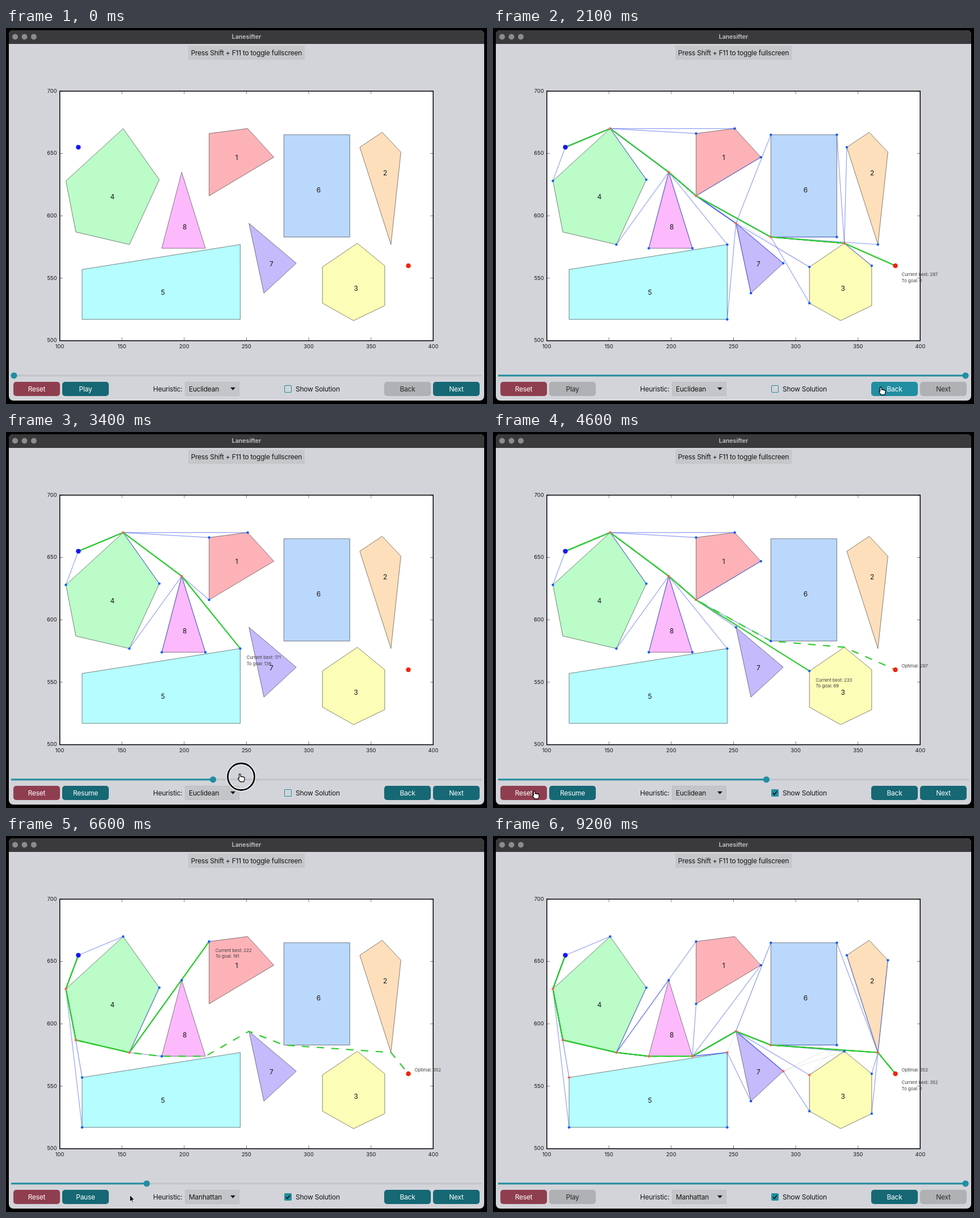
Write an HTML page with a canvas that moves like this. It is 847 px wide and 661 px high and loops after 9780 ms.

```html
<!DOCTYPE html>
<html lang="en">
<head>
<meta charset="utf-8">
<title>Lanesifter</title>
<style>
html, body { margin: 0; width: 100%; height: 100%; overflow: hidden; background: #000; }
canvas { display: block; }
</style>
</head>
<body>
<canvas id="stage" width="847" height="661"></canvas>
<script>
const ctx = document.getElementById('stage').getContext('2d');
const LOOP = 9780, TICK = 100, STEP_MS = 140, GLIDE_MS = 500;
const TEAL = '#156874', LIGHT_TEAL = '#218ea1', GREEN = '#32cd32', RED = '#8f3e50';

// Obstacles, clockwise, in plot units
const polygons = [
  ['#fdb2b8', [[220, 666], [251, 670], [272, 647], [220, 616]]],
  ['#fedfbb', [[359, 667], [374, 651], [366, 577], [341, 655]]],
  ['#fcfdb6', [[339, 578], [361, 560], [361, 528], [336, 516], [311, 530], [311, 559]]],
  ['#bbfcc9', [[151, 670], [180, 629], [156, 577], [113, 587], [105, 628]]],
  ['#b5fdfe', [[118, 557], [245, 577], [245, 517], [118, 517]]],
  ['#bad7fc', [[280, 665], [333, 665], [333, 583], [280, 583]]],
  ['#c5bafc', [[252, 594], [290, 562], [264, 538]]],
  ['#fcbafc', [[198, 635], [217, 574], [182, 574]]]
].map(([color, points]) => ({ color, points }));
const nodes = [[115, 655], ...polygons.flatMap(p => p.points), [380, 560]];
const GOAL = nodes.length - 1;

const euclidean = (a, b) => Math.hypot(a[0] - b[0], a[1] - b[1]);
const manhattan = (a, b) => Math.abs(a[0] - b[0]) + Math.abs(a[1] - b[1]);
const clamp = (v, lo, hi) => Math.max(lo, Math.min(hi, v));

// Does segment ab run through the inside of a convex polygon?
function crosses(a, b, points) {
  let t0 = 0, t1 = 1;
  for (let i = 0; i < points.length; i++) {
    const p = points[i], q = points[(i + 1) % points.length];
    const inside = s => (q[1] - p[1]) * (s[0] - p[0]) - (q[0] - p[0]) * (s[1] - p[1]);
    const da = inside(a), db = inside(b);
    if (da <= 0 && db <= 0) return false;
    if (da < 0) t0 = Math.max(t0, da / (da - db));
    else if (db < 0) t1 = Math.min(t1, da / (da - db));
  }
  return t1 - t0 > 1e-9;
}

function neighbours(n) {
  const here = nodes[n];
  return nodes.map((_, i) => i)
    .filter(i => i !== n && !polygons.some(p => crosses(here, nodes[i], p.points)))
    .sort((i, j) => euclidean(here, nodes[i]) - euclidean(here, nodes[j]));
}

function pathTo(node, parent) {
  const path = [node];
  while (path[0]) path.unshift(parent[path[0]]);
  return path;
}

// A* over the visibility graph, keeping a snapshot after every expansion
function search(heuristic) {
  const cost = { 0: 0 }, parent = {}, closed = new Set(), replaced = [];
  const open = [{ node: 0, f: 0 }], steps = [null];
  while (true) {
    open.sort((a, b) => a.f - b.f);
    const node = open.shift().node;
    if (node === GOAL) return steps;
    closed.add(node);
    let current = node;
    for (const next of neighbours(node)) {
      const g = cost[node] + Math.floor(euclidean(nodes[node], nodes[next]));
      if (g >= cost[next]) continue;
      if (next in parent) replaced.push([parent[next], next]);
      cost[next] = g;
      parent[next] = node;
      open.push({ node: next, f: g + heuristic(nodes[next], nodes[GOAL]) });
      if (current !== GOAL) current = next;
    }
    steps.push({
      parent: { ...parent }, closed: new Set(closed), replaced: [...replaced],
      current, path: pathTo(current, parent), cost: cost[current]
    });
  }
}
const runs = { Euclidean: search(euclidean), Manhattan: search(manhattan) };

// Control strip: left edge, width and where the pointer lands
const controls = {
  reset: { x: 13, w: 82, aim: 60 },
  play: { x: 99, w: 82, aim: 47 },
  rest: { x: 218, w: 0, aim: 0 },
  menu: { x: 315, w: 96, aim: 48 },
  solution: { x: 490, w: 98, aim: 7 },
  back: { x: 666, w: 82, aim: 17 },
  next: { x: 752, w: 82, aim: 40 }
};
const script = [
  [600, 'play'], [2200, 'back'], [2400, 'back'], [2600, 'knob', 1000], [3800, 'solution'],
  [4700, 'reset'], [5100, 'menu'], [5400, 'menu'], [5800, 'play'], [6300, 'rest', 0],
  [7600, 'play'], [8400, 'next'], [8600, 'next']
].map(([at, name, hold = 200]) => ({ at, name, end: at + hold }));

// The drag sweeps quickly left, then slowly right
const dragX = t => 14 + (t < 2900 ? 2 * (2900 - t) : 0.8 * (t - 2900));

function spot({ name, end }, t) {
  if (name === 'knob') return { x: dragX(Math.min(t, end - TICK)), y: 606 };
  return { x: controls[name].x + controls[name].aim, y: 631 };
}

function pointerAt(t) {
  const final = script[script.length - 1];
  if (t < TICK || t > final.end + 300) return null;
  const i = script.findIndex(e => t < e.end);
  const target = script[i] || final, before = script[i - 1];
  const to = spot(target, Math.max(t, target.at));
  const from = before ? spot(before, t) : { x: 800, y: 655 };
  const arrive = target.at - TICK;
  const leave = Math.max(before ? before.end : TICK, arrive - GLIDE_MS);
  const k = clamp((t - leave) / Math.max(1, arrive - leave), 0, 1);
  const ease = i < 0 || t >= target.at ? 1 : k * k * (3 - 2 * k);
  return { x: from.x + (to.x - from.x) * ease, y: from.y + (to.y - from.y) * ease };
}

// Replay every click up to time t
function stateAt(t) {
  const s = { step: 0, heuristic: 'Euclidean', solution: false, menu: false, playStart: null, fresh: true };
  const last = () => runs[s.heuristic].length - 1;
  const advance = now => {
    if (s.playStart !== null) s.step = Math.min(last(), Math.floor((now - s.playStart) / STEP_MS));
  };
  const stop = () => { s.playStart = null; };
  const actions = {
    play(now) { s.playStart = s.playStart === null ? now : null; s.fresh = false; },
    back() { stop(); s.step--; },
    next() { stop(); s.step++; },
    knob(now) { s.step = Math.round((dragX(now) - 14) / 818 * last()); },
    reset() { stop(); s.step = 0; s.fresh = true; },
    solution() { s.solution = !s.solution; },
    menu() { if (s.menu) s.heuristic = 'Manhattan'; s.menu = !s.menu; },
    rest() {}
  };
  for (const { at, name, end } of script) {
    const drag = name === 'knob';
    if (t < (drag ? at : end)) break;
    advance(end);
    actions[name](drag ? Math.min(t, end - TICK) : end);
  }
  advance(t);
  s.last = last();
  s.label = s.fresh || s.step === s.last ? 'Play' : s.playStart === null ? 'Resume' : 'Pause';
  s.pointer = pointerAt(t);
  const press = script.find(e => t >= e.at && t < e.end);
  s.pressed = !!press;
  s.dragging = s.pressed && press.name === 'knob';
  return s;
}

const X = x => 94.5 + (x - 100) * 2.193;
const Y = y => 549.5 - (y - 500) * 2.193;

function text(s, x, y, { size = 12, color = '#151515', align = 'left', weight = 400, spacing = -0.25 } = {}) {
  ctx.font = `${weight} ${size}px Inter, sans-serif`;
  ctx.letterSpacing = spacing + 'px';
  ctx.fillStyle = color;
  ctx.textAlign = align;
  ctx.textBaseline = 'middle';
  ctx.fillText(s, x, y + 0.5);
}
function box(x, y, w, h, r, fill) {
  ctx.beginPath();
  ctx.roundRect(x, y, w, h, r);
  ctx.fillStyle = fill;
  ctx.fill();
}
function dot(x, y, r, fill) {
  ctx.beginPath();
  ctx.arc(x, y, r, 0, 7);
  ctx.fillStyle = fill;
  ctx.fill();
}
function ring(x, y, r, color, width) {
  ctx.beginPath();
  ctx.arc(x, y, r, 0, 7);
  ctx.strokeStyle = color;
  ctx.lineWidth = width;
  ctx.stroke();
}
function line(points, color, width, fill) {
  ctx.beginPath();
  points.forEach(([x, y]) => ctx.lineTo(x, y));
  if (fill) {
    ctx.closePath();
    ctx.fillStyle = fill;
    ctx.fill();
  }
  ctx.strokeStyle = color;
  ctx.lineWidth = width;
  ctx.stroke();
}
const plotted = points => points.map(([x, y]) => [X(x), Y(y)]);
const route = (ids, color, width) => line(plotted(ids.map(i => nodes[i])), color, width);
const note = (s, x, y) => text(s, x, y, { size: 8, color: '#444', spacing: -0.15 });

function drawWindow() {
  ctx.fillStyle = '#000';
  ctx.fillRect(0, 0, 847, 661);
  box(5, 4, 837, 651, 8, '#d3d4d9');
  box(5, 4, 837, 24, [8, 8, 0, 0], '#3a3a3c');
  for (const x of [16, 32.5, 49]) dot(x, 15.5, 5, '#8c8c8c');
  text('Lanesifter', 423.5, 15, { size: 10.5, weight: 700, color: '#b8b8b8', align: 'center', spacing: 0 });
  box(321, 31, 205, 25, 1, '#c6c7cb');
  text('Press Shift + F11 to toggle fullscreen', 423.5, 43.5, { align: 'center' });
}

function drawAxes() {
  ctx.fillStyle = '#fff';
  ctx.fillRect(95, 111, 657, 438.5);
  const label = { size: 9.3, spacing: 0 };
  for (let v = 100; v <= 400; v += 50) {
    line([[X(v), 549], [X(v), 544]], '#555', 0.8);
    line([[X(v), 111], [X(v), 116]], '#555', 0.8);
    text(v, X(v), 559.5, { ...label, align: 'center' });
  }
  for (let v = 500; v <= 700; v += 50) {
    line([[95, Y(v)], [100, Y(v)]], '#555', 0.8);
    line([[752, Y(v)], [747, Y(v)]], '#555', 0.8);
    text(v, 89.5, Y(v) - 0.5, { ...label, align: 'right' });
  }
  ctx.strokeStyle = '#000';
  ctx.lineWidth = 1.5;
  ctx.strokeRect(94.75, 111, 657.5, 438.7);
}

function drawPolygons() {
  polygons.forEach(({ color, points }, i) => {
    line(plotted(points), 'rgba(0,0,0,.6)', 0.8, color);
    const mean = axis => points.reduce((sum, p) => sum + p[axis], 0) / points.length;
    text(i + 1, X(mean(0)) + 3, Y(mean(1)) + 7, { align: 'center', spacing: 0 });
  });
}

function drawSearch(state, best) {
  const [gx, gy] = plotted([nodes[GOAL]])[0];
  const reached = state ? Object.keys(state.parent).map(Number) : [];
  if (state) {
    for (const edge of state.replaced) route(edge, 'rgba(90,90,90,.15)', 1);
    // Shared stretches grow stronger as paths overlap
    for (const id of reached) route(pathTo(id, state.parent), 'rgba(70,95,235,.5)', 1.4);
  }
  if (best) {
    ctx.setLineDash([13, 13]);
    route(best.path, GREEN, 2.2);
    ctx.setLineDash([]);
    note('Optimal: ' + best.cost, gx + 11, gy - 6.5);
  }
  if (state) {
    route(state.path, GREEN, 2.3);
    for (const id of reached) {
      const [x, y] = nodes[id];
      dot(X(x), Y(y), 2.2, state.closed.has(id) ? '#ff6058' : '#0f5ff5');
    }
    const at = nodes[state.current], x = X(at[0]) + 11, y = Y(at[1]);
    note('Current best: ' + state.cost, x, y + 15.5);
    note('To goal: ' + Math.floor(euclidean(at, nodes[GOAL])), x, y + 26);
  }
  dot(X(115), Y(655), 4.2, '#1616f2');
  dot(gx, gy, 4.2, '#f22410');
}

const over = (p, { x, w }) => p && p.x > x && p.x < x + w && p.y > 622 && p.y < 647;

function drawControls(ui) {
  const { pointer, pressed, step, last } = ui;
  const knob = 14 + 818 * step / last;
  line([[9, 611], [838, 611]], '#c2c3c8', 3);
  line([[9, 611], [knob, 611]], LIGHT_TEAL, 3);
  dot(knob, 611, 5.6, LIGHT_TEAL);

  const button = (name, label, enabled, color = TEAL) => {
    const { x, w } = controls[name];
    const hover = color === TEAL && !pressed && over(pointer, controls[name]);
    box(x, 622, w, 25, 5, !enabled ? '#b0b1b4' : hover ? LIGHT_TEAL : color);
    text(label, x + w / 2, 634.5, { color: enabled ? '#fff' : '#2a2a2a', align: 'center' });
  };
  button('reset', 'Reset', true, RED);
  button('play', ui.label, step < last);
  button('back', 'Back', step > 0);
  button('next', 'Next', step < last);

  text('Heuristic:', 259, 634.5);
  box(315, 622, 96, 25, 2, '#b9babe');
  box(315.7, 622.7, 94.6, 23.6, 2, '#c4c5c9');
  text(ui.heuristic, 322, 634.5);
  line([[395.5, 632], [403.5, 632], [399.5, 636.5]], '#111', 0.4, '#111');
  if (ui.menu) {
    box(315, 600, 96, 46, 4, '#e6e6e9');
    box(317, 623, 92, 21, 3, LIGHT_TEAL);
    text('Euclidean', 322, 611.5);
    text('Manhattan', 322, 633.5, { color: '#fff' });
  }

  box(490, 628, 13, 13, 2, LIGHT_TEAL);
  if (ui.solution) line([[493, 634.5], [495.5, 637.5], [500, 631.5]], '#111', 1.6);
  else box(491, 629, 11, 11, 1, '#d3d4d9');
  text('Show Solution', 510, 634.5);
}

const ARROW = new Path2D('M0 0V12L2.8 9.5L4.6 13.5L6.5 12.6L4.7 8.8H8.4Z');
const HAND = new Path2D('M-1.5 1Q0 -.6 1.2 1V5Q2.6 4 3.7 5.3Q5 4.4 6 5.8Q7.6 5.2 8 7V9.5Q8 12 6.5 13.8H.4L-3.2 9.2Q-4.3 7 -1.5 8Z');

function drawPointer({ pointer, pressed, dragging }) {
  if (!pointer) return;
  const { x, y } = pointer;
  const hand = dragging || Object.values(controls).some(c => over(pointer, c));
  if (pressed) {
    ring(x, y, 23.5, '#fff', 5);
    ring(x, y, 23.5, '#000', 2.8);
  }
  ctx.save();
  ctx.translate(dragging ? x - 2 : x, dragging ? y - 5 : y);
  ctx.lineJoin = 'round';
  ctx.lineWidth = hand ? 1.2 : 1;
  ctx.fillStyle = hand ? '#fff' : '#000';
  ctx.strokeStyle = hand ? '#000' : '#fff';
  ctx.fill(hand ? HAND : ARROW);
  ctx.stroke(hand ? HAND : ARROW);
  ctx.restore();
}

function render(time) {
  const ui = stateAt(Math.floor(time % LOOP / TICK) * TICK);
  const run = runs[ui.heuristic];
  drawWindow();
  drawAxes();
  drawPolygons();
  drawSearch(run[ui.step], ui.solution && run[ui.last]);
  drawControls(ui);
  drawPointer(ui);
}

const begin = performance.now();
(function loop() {
  render(performance.now() - begin);
  requestAnimationFrame(loop);
})();
</script>
</body>
</html>
```
